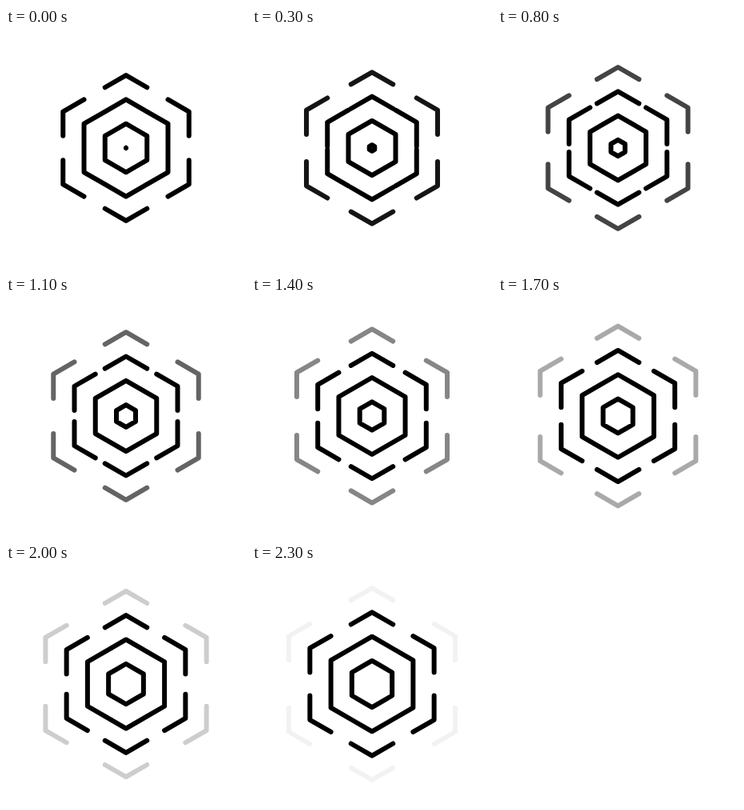
Recreate the animation shown at these times as an HTML page. Size 300 px wide and 300 px high, loop 2400 ms.

```html
<!DOCTYPE html>
<html lang="en">
<head>
<meta charset="utf-8">
<title>Expanding hexagons</title>
<style>
  html, body { margin: 0; width: 100%; height: 100%; overflow: hidden; background: #fff; }
  svg { display: block; width: 100%; height: 100%; }
  path { fill: none; stroke: #000; stroke-width: 6; stroke-linecap: round; stroke-linejoin: round; }
</style>
</head>
<body>
<svg viewBox="0 0 300 300"><path/><path/><path/><path/></svg>
<script>
const LOOP = 2400, TICK = 100, STEP = 30.3, CENTER = 150;
const rings = [...document.querySelectorAll('path')];

const corner = (k, r) => {
  const a = (k * 60 - 90) * Math.PI / 180;
  return [CENTER + r * Math.cos(a), CENTER + r * Math.sin(a)];
};

// Six corner brackets; they meet in a closed hexagon while r <= 2 * STEP.
function hexagon(r) {
  const share = Math.min(0.5, STEP / r);
  let d = '';
  for (let k = 0; k < 6; k++) {
    const tip = corner(k, r);
    const arm = j => corner(j, r).map((v, i) => tip[i] + (v - tip[i]) * share);
    d += `M${arm(k - 1)}L${tip}L${arm(k + 1)}`;
  }
  return d;
}

function draw(time) {
  const p = Math.floor(time % LOOP / TICK) * TICK / LOOP;
  rings.forEach((ring, i) => ring.setAttribute('d', hexagon(Math.max(0.01, (i + p) * STEP))));
  rings[3].setAttribute('stroke-opacity', 1 - p ** 1.2);
}

const start = performance.now();
function loop() {
  draw(performance.now() - start);
  requestAnimationFrame(loop);
}
loop();
</script>
</body>
</html>
```
